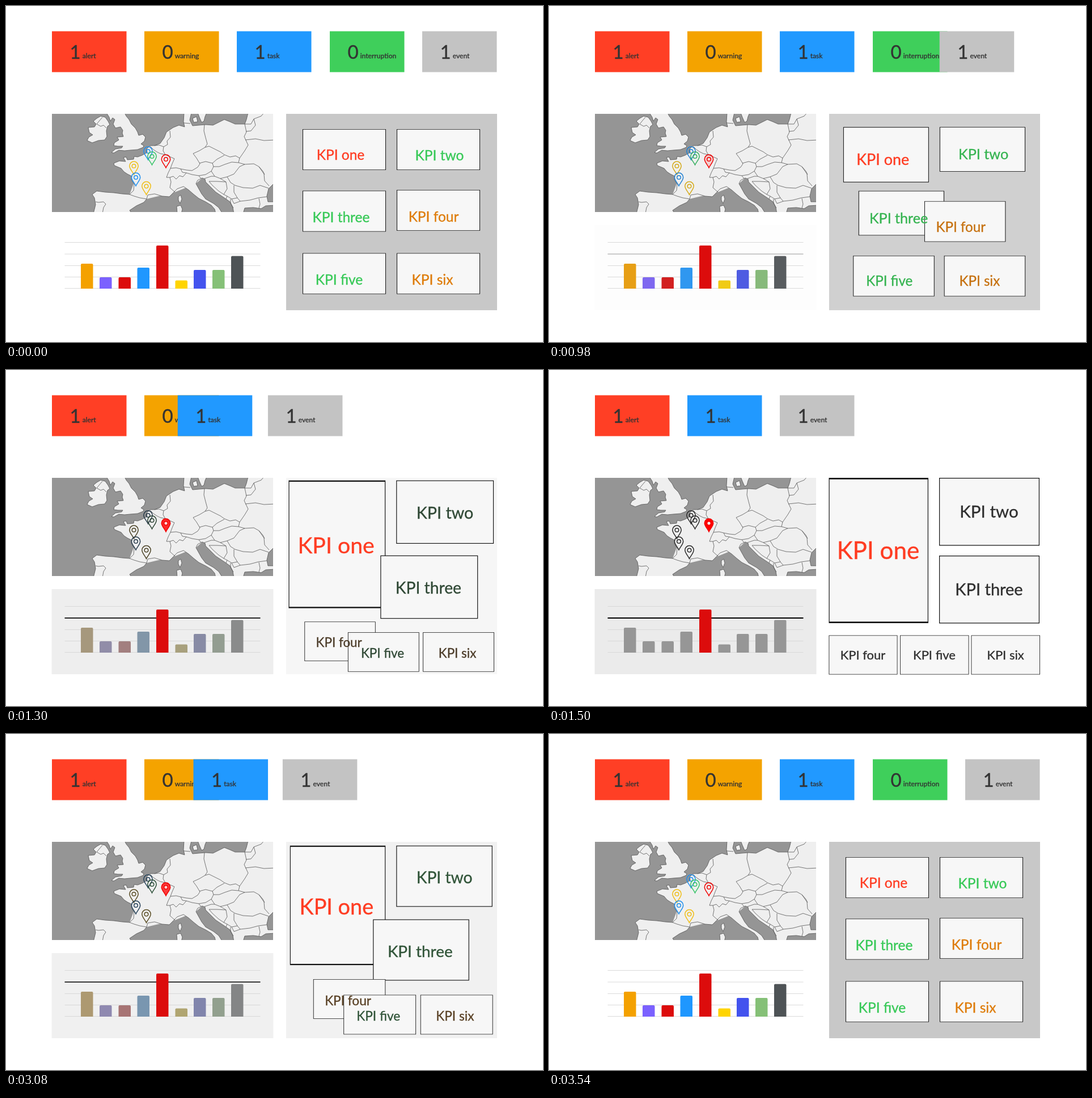
An HTML page for the animation above (3.76 s loop, 947 by 592 pixels).

```html
<!DOCTYPE html>
<html lang="en">
<head>
<meta charset="utf-8">
<title>KPI dashboard</title>
<style>
html, body { margin: 0; width: 100%; height: 100%; overflow: hidden; background: #fff; }
svg { display: block; width: 100vw; height: 100vh; }
text { font-family: Lato, "Open Sans", sans-serif; stroke-width: .35; }
.mid { text-anchor: middle; }
.land { fill: #efefef; }
.land, .border { stroke: #4d4d4d; stroke-width: .75; stroke-linejoin: round; }
.border { fill: none; }
</style>
</head>
<body>
<svg viewBox="0 0 947 592">
  <clipPath id="frame"><rect x="81" y="190" width="390" height="173"/></clipPath>
  <g clip-path="url(#frame)">
    <rect x="81" y="190" width="390" height="173" fill="#959595"/>
    <g class="land">
      <!-- Ireland, Great Britain -->
      <path d="M160 198L167 194 175 196 180 203 183 209 179 212 177 220 178 230 174 236 163 237 152 241 143 237 146 231 153 227 147 223 145 214 156 213 159 208 154 203z"/>
      <path d="M177 188L182 196 184 203 188 197 192 200 189 208 193 215 202 213 206 219 205 224 207 230 196 231 199 236 191 241 190 246 197 247 206 247 204 250 193 252 186 258 190 259 199 254 209 255 219 254 232 253 242 249 243 246 238 243 244 238 246 231 241 226 234 228 232 222 228 215 221 208 217 200 212 194 209 188z"/>
      <!-- mainland: Baltic and Atlantic side, then Mediterranean side -->
      <path stroke="none" d="M475 188L427 188 424 200 421 208 404 208 395 204 385 200 375 205 365 210 352 209 340 210 329 211 324 201 327 188 314 188 313 204 315 213 305 210 295 214 283 222 279 232 272 242 262 246 254 246 248 252 249 258 240 263 232 266 226 265 225 270 214 271 212 266 207 267 211 274 200 273 190 277 191 281 203 286 208 292 214 296 222 300 221 306 226 314 225 325 218 332 248 340 298 328 335 313 346 303 400 317 475 310z"/>
      <path stroke="none" d="M218 332L205 331 190 329 175 328 160 326 152 332 156 338 158 350 154 366 222 366 218 360 230 352 243 346 248 340 250 333 262 331 275 335 288 336 296 328 302 322 313 318 322 324 330 331 340 339 352 345 362 351 368 358 370 366 382 366 375 355 366 348 352 340 345 331 340 322 335 313 338 307 346 303 351 305 352 310 360 318 370 328 385 338 395 345 400 355 402 366 418 366 421 356 436 355 450 357 458 352 475 351 475 345 462 345 460 335 463 322 475 310 440 280 350 290 290 280 230 300z"/>
      <path d="M329 198L336 195 338 204 331 205zM338 188L341 196 345 205 349 203 351 195 354 188zM308 333L310 340 307 348 304 342 304 336zM301 353L308 351 311 358 309 366 302 366z"/>
    </g>
    <g class="border">
      <!-- coastlines -->
      <path d="M427 188L424 200 421 208 404 208 395 204 385 200 375 205 365 210 352 209 340 210 329 211 324 201 327 188M314 188L313 204 315 213 305 210 295 214 283 222 279 232 272 242 262 246 254 246 248 252 249 258 240 263 232 266 226 265 225 270 214 271 212 266 207 267 211 274 200 273 190 277 191 281 203 286 208 292 214 296 222 300 221 306 226 314 225 325 218 332 205 331 190 329 175 328 160 326 152 332 156 338 158 350 154 366"/>
      <path d="M222 366L218 360 230 352 243 346 248 340 250 333 262 331 275 335 288 336 296 328 302 322 313 318 322 324 330 331 340 339 352 345 362 351 368 358 370 366M382 366L375 355 366 348 352 340 345 331 340 322 335 313 338 307 346 303 351 305 352 310 360 318 370 328 385 338 395 345 400 355 402 366M418 366L421 356 436 355 450 357 458 352 475 351M475 345L462 345 460 335 463 322 475 310"/>
      <!-- western and central borders -->
      <path d="M170 196L164 203 160 208 167 212 172 210 177 215M158 345L163 346 172 345 176 349 172 355 170 366M218 332L226 335 236 338 248 340M254 247L260 253 266 257 272 260 281 262 290 266 297 269 293 278 290 286 286 294 283 302 289 302 291 310 289 320 298 328M262 246L270 245 278 248 277 255 281 262M289 220L290 231 284 238 285 244 278 248M313 206L325 207"/>
      <path d="M290 286L300 285 308 287 311 293 318 294 312 301 306 299 300 305 295 300 289 302M308 287L318 289 328 290 338 284 342 278 336 268 330 260 341 255 351 249 358 247 368 252 378 257 385 262 395 266 405 264 412 268M341 277L352 274 364 277 372 270 385 263M350 209L349 220 352 232 355 243 351 249M318 294L328 297 340 299 352 297 362 291 366 283 364 277"/>
      <!-- eastern and Balkan borders -->
      <path d="M421 208L424 222 420 230 427 245 421 255 412 268 410 276 398 275 386 279 376 283 366 283M362 291L368 300 378 304 390 301 402 296 412 283 421 279 410 276M421 279L437 278 446 283 455 296 456 308 464 317M390 301L396 311 404 316 418 320 435 321 448 316 463 321M421 208L432 208 437 199 450 194 455 188M437 199L440 210 432 220 423 221M422 236L440 234 455 237 475 236M446 283L453 291 456 297"/>
      <path d="M340 299L344 304M350 304L362 300 368 300M378 304L388 310 390 322 384 332 375 326 364 316 358 309 372 309 388 310M402 316L402 328 408 338 398 340 390 335 384 332M390 335L388 340M408 338L413 344 430 342 445 338 460 336M398 340L402 348 413 344M396 340L396 347 401 356M446 339L448 349 446 356"/>
    </g>
  </g>
  <g id="live"></g>
</svg>
<script>
const LOOP = 3760, SPAN = 700, GO = 800, BACK = 2840;
const DARK = '#2f2f2f', RED = '#ff3c22', GREEN = '#37c957', ORANGE = '#de7c0a';

// [x, y, w, h, text centre, baseline, font size] before and after
const kpis = [
  ['one', RED, [523, 217, 147, 72, 590, 271, 24.5], [493.5, 190, 175.5, 256, 580.5, 333, 42.2]],
  ['two', GREEN, [689, 217, 147, 72, 764.5, 272, 24.5], [688, 190, 177, 119.5, 776, 260, 29.5]],
  ['three', GREEN, [523, 325.5, 147, 72, 591, 380.5, 24.5], [688, 327, 177, 119.5, 776, 397, 29]],
  ['four', ORANGE, [689, 324, 147, 72, 754, 379.5, 24.5], [493.5, 467.5, 121, 69, 553.5, 510, 22]],
  ['five', GREEN, [523, 435.5, 147, 72, 587.5, 490.5, 24.5], [619, 467.5, 121.5, 69, 679.5, 510, 22]],
  ['six', ORANGE, [689, 435.5, 147, 72, 752, 490.5, 24.5], [744.5, 467.5, 121.5, 69, 805, 510, 22]]
];
// [x, top, colour]
const bars = [
  [132, 454, '#f4a100'], [165, 478, '#7b61ff'], [198.5, 478, '#dc0c0c'],
  [231.5, 461, '#1f97ff'], [265, 422, '#dc0c0c'], [298.5, 483.5, '#ffd400'],
  [331, 465, '#4353ee'], [364, 465, '#85c077'], [397, 440.5, '#4e5356']
];
const pins = [
  [250.5, 256, '#1f8fee'], [257.5, 265, '#37c468'], [282, 270, '#f20000'],
  [225.5, 282, '#efbe18'], [229, 302, '#1f8fee'], [247.5, 317.5, '#efbe18']
];

const live = document.getElementById('live');
const clamp = v => Math.min(1, Math.max(0, v));
const lerp = (a, b, p) => a + (b - a) * p;

function mix(a, b, p) {
  const part = (c, i) => parseInt(c.substr(i, 2), 16);
  return `rgb(${[1, 3, 5].map(i => Math.round(lerp(part(a, i), part(b, i), p)))})`;
}

// cubic-bezier(.42, 0, .58, 1)
function ease(u) {
  let lo = 0, hi = 1, s;
  for (let i = 0; i < 20; i++) {
    s = (lo + hi) / 2;
    const x = 1.26 * s * (1 - s) ** 2 + 1.74 * s * s * (1 - s) + s ** 3;
    if (x < u) lo = s; else hi = s;
  }
  return s * s * (3 - 2 * s);
}

const rect = (x, y, w, h, fill, more = '') =>
  `<rect x="${x}" y="${y}" width="${w}" height="${h}" fill="${fill}" ${more}/>`;
const text = (x, y, size, color, str, more = '') =>
  `<text x="${x}" y="${y}" font-size="${size}" fill="${color}" stroke="${color}" ${more}>${str}</text>`;
const rule = (y, color, width, alpha = 1) =>
  `<path d="M103.5 ${y}H448.5" stroke="${color}" stroke-width="${width}" opacity="${alpha}"/>`;

const card = (x, color, count, label) =>
  rect(x, 44.5, 131.5, 72, color) +
  text(x + 31.5, 93, 33, '#333333', count) +
  text(x + 53.7, 92.3, 12.1, '#333333', label);

function cards(p) {
  return card(81, '#ff3f25', 1, 'alert') +
    (p < 1 ? card(244, '#f4a300', 0, 'warning') : '') +
    card(Math.min(407, 244 + 350 * (1 - p)), '#2199ff', 1, 'task') +
    (p < .5 ? card(571, '#3fcf5b', 0, 'interruption') : '') +
    card(lerp(734, 407, p), '#c3c3c3', 1, 'event');
}

function pin([x, y, color], p) {
  const hot = color === '#f20000';
  const line = hot ? color : mix(color, '#2a2a2a', p);
  return `<g transform="translate(${x} ${y})" stroke="${line}" stroke-width="1.5" fill="none">
    <path d="M0 15C-2.5 9.5 -7.7 5 -7.7 -.2A7.7 7.7 0 0 1 7.7 -.2C7.7 5 2.5 9.5 0 15z" fill="#ff0000" fill-opacity="${hot ? p : 0}"/>
    <circle r="3.3" fill="#fff" fill-opacity="${hot ? p : 0}"/></g>`;
}

function chart(p) {
  return rect(80.5, 386, 391, 150, '#ebebeb', `opacity="${p}"`) +
    [416.5, 437, 457.5, 477.5, 497.5].map(y => rule(y, '#d6d6d6', .9)).join('') +
    rule(437, '#000', 1.8, p) +
    bars.map(([x, y, color], i) => {
      const fill = i === 4 ? color : mix(color, '#969696', p);
      return `<path d="M${x} 498V${y + 2}q0 -2 2 -2h17.5q2 0 2 2V498z" fill="${fill}"/>`;
    }).join('');
}

function board(p) {
  let boxes = '', labels = '';
  for (const [name, color, from, to] of kpis) {
    const [x, y, w, h, cx, base, size] = from.map((v, i) => lerp(v, to[i], p));
    // borders thicken with the stretch of the box
    const bx = w / 147, by = .75 * h / 72;
    boxes += rect(x, y, w, h, '#111') + rect(x + bx, y + by, w - 2 * bx, h - 2 * by, '#f7f7f7');
    labels += text(cx, base, size, name === 'one' ? color : mix(color, DARK, p), 'KPI ' + name, 'class="mid"');
  }
  return rect(494, 190, 372, 346, mix('#c8c8c8', '#ffffff', p)) + boxes + labels;
}

function draw(now) {
  const t = now % LOOP;
  const p = ease(clamp((t - GO) / SPAN)) - ease(clamp((t - BACK) / SPAN));
  const q = p > .9999 ? 1 : clamp(p);
  live.innerHTML = cards(q) + pins.map(d => pin(d, q)).join('') + chart(q) + board(q);
}

const start = performance.now();
function tick() {
  draw(performance.now() - start);
  requestAnimationFrame(tick);
}
tick();
</script>
</body>
</html>
```
